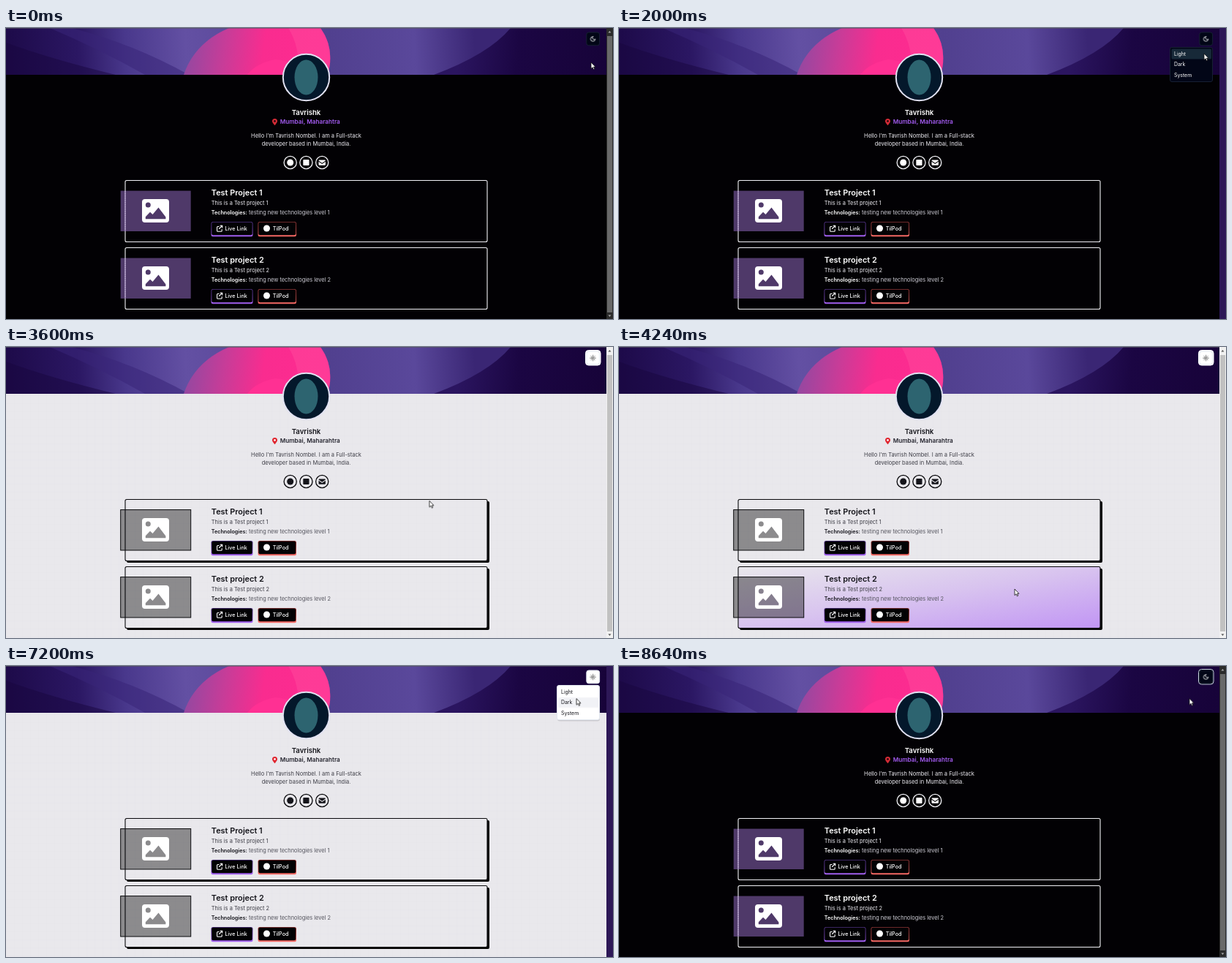
An HTML page for the animation above (8800 ms loop, 830 px wide and 398 px high).

```html
<!DOCTYPE html>
<html lang="en">
<head>
<meta charset="utf-8">
<title>Portfolio theme switch</title>
<style>
  html, body { margin: 0; width: 100%; height: 100%; overflow: hidden; background: #020104; }
  svg { display: block; width: 830px; height: 398px; font-family: Inter, sans-serif; animation: theme 8.8s step-end infinite; }

  /* Theme, menu and focus state change together on click. */
  @keyframes theme {
    0%, 84.55% {
      --page: #020104; --grid: #fff0; --ink: #fff; --soft: #cfced6; --body: #f0eff4; --place: #a45cf2;
      --line: #f2f2f6; --shadow: #0000; --photo: #a77bdd77; --frame: #0000; --panel: #020617; --edge: #172033;
      --pick: #172938; --ring: #cbd5e1; --track: #2b2b2b; --thumb: #696969; --arrow: #aaa; --hole: #24070c;
      --pin: #d42b36; --point: #fff; --photo-line: #fff6;
    }
    27.27% {
      --page: #e9e8ec; --grid: #dddde425; --ink: #15151b; --soft: #55555e; --body: #3d3d46; --place: #24242e;
      --line: #08080b; --shadow: #000; --photo: #0006; --frame: #09090b; --panel: #fff; --edge: #e2e8f0;
      --pick: #f1f2f6; --ring: #fff; --track: #f1f1f1; --thumb: #c1c1c1; --arrow: #555; --hole: #fff;
      --pin: #e0242e; --point: #fff; --photo-line: #0000;
    }
  }
  .page { fill: var(--page); }
  .grid { fill: none; stroke: var(--grid); }
  .ink { fill: var(--ink); }
  .body { fill: var(--body); }
  .soft { fill: var(--soft); }
  .place { fill: var(--place); }
  .outline { fill: none; stroke: var(--line); }
  .shadow { fill: var(--shadow); }
  .photo { fill: var(--photo); stroke: var(--frame); }
  .photo-line { stroke: var(--photo-line); stroke-dasharray: 1.5 1.5; }
  .panel { fill: var(--panel); stroke: var(--edge); }
  .pick { fill: var(--pick); }
  .b { font-weight: 600; }
  .m { font-weight: 500; }
  .mid { text-anchor: middle; }
  .line-icon { fill: none; stroke-linecap: round; stroke-linejoin: round; }

  .bar { animation: bar 8.8s step-end infinite; }
  @keyframes bar { 0%, 27.27%, 84.55% { opacity: 1 } 12.73%, 76.36% { opacity: 0 } }

  .ring { fill: var(--panel); stroke: var(--ring); animation: ring 8.8s step-end infinite; }
  @keyframes ring { 0%, 76.36% { opacity: 0 } 27.27%, 84.55% { opacity: 1 } }

  .menu { transform-origin: 782px 26px; animation: menu 8.8s linear infinite; }
  @keyframes menu {
    0%, 12.73%, 27.28%, 76.36%, 84.56%, 100% { opacity: 0; transform: scale(.95) }
    14.5%, 27.27%, 78.1%, 84.55% { opacity: 1; transform: none }
  }
  .pick { animation: pick 8.8s step-end infinite; }
  @keyframes pick {
    0%, 27.27% { opacity: 0; transform: none }
    21.4% { opacity: 1; transform: none }
    80.1% { opacity: 1; transform: none }
    80.9% { opacity: 1; transform: translateY(14.5px) }
    84.55% { opacity: 0; transform: none }
  }

  .moon, .sun { transform-origin: 802.5px 15px; }
  .moon { animation: moon 8.8s linear infinite; }
  .sun { animation: sun 8.8s linear infinite; }
  @keyframes moon {
    0%, 27.27%, 86.3%, 100% { transform: none }
    29%, 84.55% { transform: rotate(90deg) scale(0) }
  }
  @keyframes sun {
    0%, 27.27%, 86.3%, 100% { transform: rotate(-90deg) scale(0) }
    29%, 84.55% { transform: none }
  }

  .glow { opacity: 0; }
  .glow1 { animation: glow1 8.8s linear infinite; }
  .glow2 { animation: glow2 8.8s linear infinite; }
  @keyframes glow1 {
    0%, 41.2%, 47.5%, 54%, 61.5%, 100% { opacity: 0 }
    43.2%, 45.4%, 56%, 59.3% { opacity: 1 }
  }
  @keyframes glow2 { 0%, 45.6%, 56%, 100% { opacity: 0 } 47.6%, 54% { opacity: 1 } }

  .cursor { fill: var(--point); stroke: #111; stroke-width: .8; animation: cursor 8.8s ease-in-out infinite; }
  @keyframes cursor {
    0%, .9% { transform: translate(800px, 47px) }
    10.9%, 20% { transform: translate(804px, 15px) }
    22.2%, 32.7% { transform: translate(800px, 35px) }
    40.9% { transform: translate(579px, 210px); animation-timing-function: linear }
    43.6% { transform: translate(563px, 255px) }
    47.2%, 52.3% { transform: translate(541px, 331px) }
    56.4% { transform: translate(560px, 250px) }
    58.2% { transform: translate(570px, 240px) }
    64.1%, 68.2% { transform: translate(832px, 20px) }
    73.6%, 79.1% { transform: translate(804px, 14px) }
    81.6%, 100% { transform: translate(780px, 44.5px) }
  }
</style>
</head>
<body>
<svg id="stage" viewBox="0 0 830 398">
  <defs>
    <linearGradient id="violet" gradientUnits="userSpaceOnUse" x1="0" y1="40" x2="821" y2="0">
      <stop offset="0" stop-color="#1d0a49"/>
      <stop offset=".12" stop-color="#2b1763"/>
      <stop offset=".2" stop-color="#49388c"/>
      <stop offset=".3" stop-color="#6350a3"/>
      <stop offset=".54" stop-color="#51408f"/>
      <stop offset=".68" stop-color="#5a489b"/>
      <stop offset=".78" stop-color="#3a2674"/>
    </linearGradient>
    <linearGradient id="pink" gradientUnits="userSpaceOnUse" x1="240" y1="10" x2="445" y2="40">
      <stop offset="0" stop-color="#8a4aa2"/>
      <stop offset=".3" stop-color="#c83c98"/>
      <stop offset=".55" stop-color="#f92c8f"/>
      <stop offset="1" stop-color="#ff2b91"/>
    </linearGradient>
    <linearGradient id="night" gradientUnits="userSpaceOnUse" x1="620" y1="20" x2="821" y2="40">
      <stop offset="0" stop-color="#2b1560"/>
      <stop offset=".4" stop-color="#1b0643"/>
      <stop offset="1" stop-color="#170339"/>
    </linearGradient>
    <linearGradient id="lilac" x2="1" y2="1">
      <stop offset="0" stop-color="#e9e8ec"/>
      <stop offset=".5" stop-color="#d8c3ef"/>
      <stop offset="1" stop-color="#c195f4"/>
    </linearGradient>
    <linearGradient id="purpleEdge" x2="0" y2="1">
      <stop offset="0" stop-color="#4b2f7c"/><stop offset="1" stop-color="#a561f5"/>
    </linearGradient>
    <linearGradient id="redEdge" x2="0" y2="1">
      <stop offset="0" stop-color="#8d3434"/><stop offset="1" stop-color="#fa6b66"/>
    </linearGradient>
    <pattern id="cells" width="11" height="11" patternUnits="userSpaceOnUse">
      <path class="grid" d="M.5 0V11M0 .5H11"/>
    </pattern>
    <clipPath id="bannerClip"><path d="M0 0H821V64H0Z"/></clipPath>
  </defs>

  <rect class="page" width="830" height="398"/>
  <rect width="821" height="398" fill="url(#cells)"/>

  <g clip-path="url(#bannerClip)">
    <rect width="821" height="64" fill="url(#violet)"/>
    <path d="M0 20Q60 42 150 64H0Z" fill="#18063f" opacity=".5"/>
    <path d="M90 0Q175 22 250 64H190Q130 30 60 0Z" fill="#392679" opacity=".55"/>
    <path d="M305 0Q258 20 243 64H440Q450 28 430 0Z" fill="url(#pink)"/>
    <path d="M330 64Q342 48 368 43Q400 46 420 64Z" fill="#ff3093"/>
    <path d="M386 0Q402 25 400 64H440Q450 28 430 0Z" fill="#ff4a9e" opacity=".5"/>
    <path d="M690 0Q660 36 585 64H821V0Z" fill="url(#night)"/>
    <path d="M0 .5H821" stroke="#55515c" opacity=".6"/>
  </g>

  <circle cx="410.5" cy="67.5" r="31.7" fill="#04182b" stroke="#e2e2f2" stroke-width="2"/>
  <ellipse cx="410.5" cy="67.5" rx="16" ry="24" fill="#2d6470"/>

  <text class="ink b mid" x="410.5" y="119" font-size="9.6">Tavrishk</text>
  <path d="M367.5 133.2C365 129.8 364 128.8 364 127.4a3.5 3.5 0 0 1 7 0C371 128.8 370 129.8 367.5 133.2Z" style="fill:var(--pin)"/>
  <circle cx="367.5" cy="127.4" r="1.3" style="fill:var(--hole)"/>
  <text class="place b" x="374.7" y="131.4" font-size="8.2">Mumbai, Maharahtra</text>
  <g class="body mid" font-size="7.5">
    <text x="410.5" y="150">Hello I'm Tavrish Nombel. I am a Full-stack</text>
    <text x="410.5" y="161.3">developer based in Mumbai, India.</text>
  </g>

  <g class="outline" stroke-width="1.3">
    <circle cx="388.7" cy="184" r="8.6"/><circle cx="410.4" cy="184" r="8.6"/><circle cx="432.2" cy="184" r="8.6"/>
  </g>
  <g class="ink">
    <circle cx="388.7" cy="184" r="4.5"/>
    <rect x="406.3" y="179.9" width="8.2" height="8.2" rx="1"/>
    <path d="M428.5 180.5h7.4q1 0 1 1l-4.7 3.3-4.7-3.3q0-1 1-1ZM427.5 182.7l4.7 3.3 4.7-3.3v4q0 1-1 1h-7.4q-1 0-1-1Z"/>
  </g>

  <g id="cards"></g>

  <path d="M821 0H830V398H821Z" fill="#2d1857"/>
  <g class="bar">
    <rect x="821" width="9" height="398" style="fill:var(--track)"/>
    <rect x="822" y="11" width="7" height="378" style="fill:var(--thumb)"/>
    <path d="M823.4 6.5h4l-2-2.6ZM823.4 392.5h4l-2 2.6Z" style="fill:var(--arrow)"/>
  </g>

  <rect class="ring" x="792.5" y="4.5" width="20.5" height="20.5" rx="4"/>
  <rect class="panel" x="793.8" y="6" width="17.8" height="17.8" rx="3"/>
  <g class="moon"><path class="line-icon" stroke="#fff" stroke-width="2.2" transform="translate(798.2 10.7) scale(.36)" d="M12 3a6 6 0 0 0 9 9 9 9 0 1 1-9-9Z"/></g>
  <g class="sun"><path class="line-icon" stroke="#111" stroke-width="2.1" transform="translate(798.2 10.7) scale(.36)" d="M8 12a4 4 0 1 0 8 0a4 4 0 1 0-8 0M12 2v2M12 20v2M2 12h2M20 12h2M5 5l1.4 1.4M17.6 17.6L19 19M5 19l1.4-1.4M17.6 6.4L19 5"/></g>

  <g class="menu" font-size="6.9">
    <rect x="754" y="27.5" width="58" height="48" rx="3" opacity=".12"/>
    <rect class="panel" x="753.5" y="26.5" width="58" height="47" rx="2.5"/>
    <rect class="pick" x="755.5" y="28.5" width="54.5" height="14" rx="1.5"/>
    <g class="ink">
      <text x="759" y="37.9">Light</text>
      <text x="759" y="52.3">Dark</text>
      <text x="759" y="66.8">System</text>
    </g>
  </g>

  <path class="cursor" d="M0 0V8.6L2 6.8L3.4 9.8L4.8 9.1L3.4 6.3H6Z"/>
</svg>
<script>
  const button = (x, width, edge, label, labelX, icon) => `
    <rect x="${x}" y="57" width="${width}" height="20.3" rx="2.5" fill="url(#${edge})"/>
    <rect x="${x + .8}" y="57.8" width="${width - 1.6}" height="17.5" rx="2" fill="#020204"/>
    ${icon}<text class="m" x="${labelX}" y="68.8" font-size="7.2" fill="#fff">${label}</text>`;

  const linkIcon = `<path class="line-icon" stroke="#fff" stroke-width="1.1"
    d="M291 63.5h-1.4q-1 0-1 1v4.8q0 1 1 1h4.6q1 0 1-1v-1.8M293 62.3h2.7v2.8M295.5 62.5l-4 4"/>`;
  const repoIcon = '<circle cx="356.5" cy="66" r="4.5" fill="#fff"/>';

  const card = (number, y, title) => `
    <g transform="translate(0 ${y})">
      <path class="shadow" d="M165 84.5H658V3H659Q661 3 661 5V85Q661 87 659 87H167Q165 87 165 84.5Z"/>
      <rect class="page" x="163" y=".5" width="495" height="84" rx="2"/>
      <rect x="163" y=".5" width="495" height="84" rx="2" fill="url(#cells)"/>
      <rect class="glow glow${number}" x="163" y=".5" width="495" height="84" rx="2" fill="url(#lilac)"/>
      <rect class="outline" x="163" y=".5" width="495" height="84" rx="2" stroke-width="1.1"/>
      <rect class="photo" x="156.7" y="14.6" width="96" height="55.4"/>
      <path class="photo-line" d="M163 15V69"/>
      <path fill="#fff" fill-rule="evenodd" d="M190 26H219Q223 26 223 30V54Q223 58 219 58H190Q186 58 186 54V30Q186 26 190 26Z
        M190.8 33.9a3.5 3.5 0 1 0 7 0a3.5 3.5 0 1 0-7 0ZM190.8 53.3H218.4V50.5L208.5 37.5L200.5 47L197 43.8L190.8 50.3Z"/>
      <text class="ink b" x="280.8" y="20.9" font-size="10.9">${title}</text>
      <text class="body" x="280.8" y="34" font-size="7.45">This is a Test project ${number}</text>
      <text class="ink b" x="280.8" y="46.8" font-size="7.2">Technologies:</text>
      <text class="soft" x="332" y="46.8" font-size="7.4">testing new technologies level ${number}</text>
      ${button(280.5, 57, 'purpleEdge', 'Live Link', 299.5, linkIcon)}
      ${button(344.5, 52.5, 'redEdge', 'TilPod', 364.8, repoIcon)}
    </g>`;

  document.getElementById('cards').innerHTML = card(1, 208, 'Test Project 1') + card(2, 300, 'Test project 2');
</script>
</body>
</html>
```
